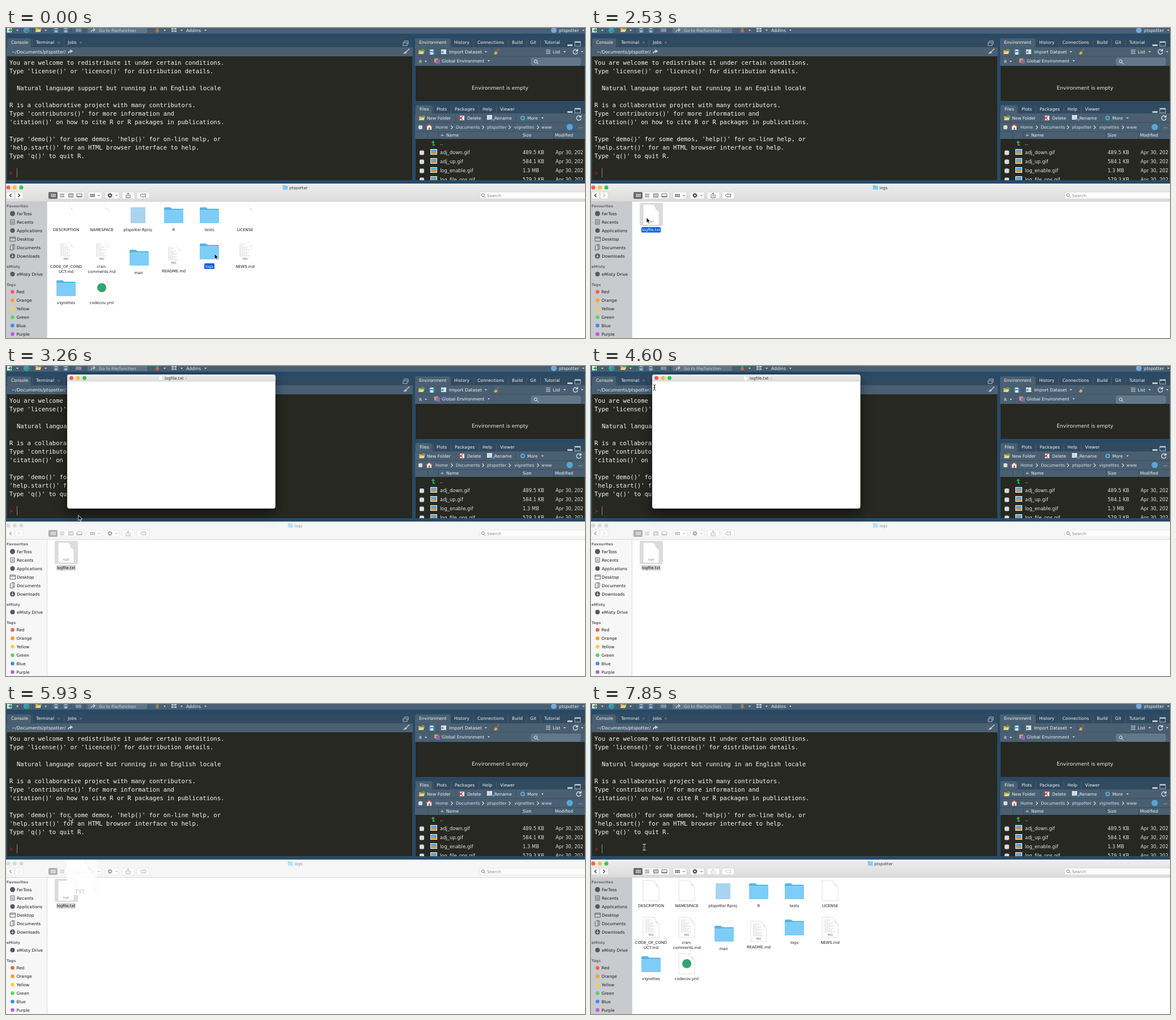
Write an HTML page that moves like this. It is 1022 px wide and 548 px high and loops after 7990 ms.

```html
<!DOCTYPE html>
<html lang="en">
<head>
<meta charset="utf-8">
<title>Log file demo</title>
<style>
html, body { margin: 0; width: 100%; height: 100%; overflow: hidden; background: #264a69; }
svg { display: block; width: 100vw; height: 100vh; font-family: "DejaVu Sans", Verdana, sans-serif; }
.mono { font-family: "DejaVu Sans Mono", monospace; }
.finder { font-family: Inter, Roboto, sans-serif; }
.bar { fill: url(#barFill); }
.side { fill: #c9cace; }
.btn { fill: #fcfcfc; stroke: #c9c9c9; stroke-width: .6; }
.glyph { fill: none; stroke: #555; stroke-width: .9; }
.solid { fill: #555; }
.paper { fill: #fff; stroke: #cfcfcf; stroke-width: .6; }
.bare .paper { stroke: none; }
.idle .bar { fill: #f6f6f6; }
.idle .side { fill: #f7f7f7; }
.idle .btn { stroke: #dedede; }
.idle .tools, .idle .heading { opacity: .5; }
.idle .light { fill: #dadada; }
.idle.hover .light { fill: var(--c); }
.light { fill: var(--c); }
.pick { fill: #0a60d8; }
.pickText { fill: #fff; }
.idle .pick { fill: #d3d3d3; }
.idle .pickText { fill: #111; }
</style>
</head>
<body>
<svg id="stage" viewBox="0 0 1022 548" preserveAspectRatio="none"></svg>
<script>
const stage = document.getElementById('stage');
const FRAME = '#264a69', TABS = '#304a60', PANEL = '#4a6072', DARK = '#272822', PALE = '#f2f4f5';

const rect = (x, y, w, h, fill, more = '') =>
  `<rect x="${x}" y="${y}" width="${w}" height="${h}" fill="${fill}" ${more}/>`;
const path = (d, more = '') => `<path d="${d}" ${more}/>`;
const line = (d, color, width = 1) => path(d, `fill="none" stroke="${color}" stroke-width="${width}"`);
const dot = (x, y, r, fill, more = '') => `<circle cx="${x}" cy="${y}" r="${r}" fill="${fill}" ${more}/>`;
// y is the middle of the line of text
const text = (x, y, s, size = 7.6, fill = PALE, more = '') =>
  `<text x="${x}" y="${(y + size * .36).toFixed(2)}" font-size="${size}" fill="${fill}" ${more}>${s}</text>`;
const mid = 'text-anchor="middle"';
const group = (s, more = '') => `<g ${more}>${s}</g>`;
const caret = (x, y, fill = '#dde') => path(`M${x - 2} ${y - 1}h4l-2 2.4z`, `fill="${fill}"`);
const chevron = (x, y, color) => line(`M${x - 1.5} ${y - 3}l3 3l-3 3`, color, 1.1);

function openFolder(x, y) {
  return path(`M${x - 5} ${y + 4}v-7h4l1 1.5h4v5.5z`, 'fill="#c9a45a"') +
    path(`M${x - 5} ${y + 4}l2.5-4.5h8l-2.5 4.5z`, 'fill="#f0d38a"') +
    path(`M${x} ${y - 3}q3-4 5 0l1-1v3h-3z`, 'fill="#4cae50"');
}
function floppy(x, y) {
  return rect(x - 4, y - 4, 9, 9, '#4a90c8') + rect(x - 2, y - 4, 5, 3, '#dcebf5') + rect(x - 2, y + 1, 5, 4, '#e9f2f8');
}
function sheet(x, y) {
  return rect(x - 4, y - 4, 9, 8, '#eef2f5') + line(`M${x - 4} ${y - 1}h9M${x - 4} ${y + 1.5}h9M${x} ${y - 4}v8`, '#8aa', .6);
}
function paneButtons(y) {
  return rect(991, y + 1, 9, 3, '#c3ccd3') + rect(1004, y - 4, 10, 8, 'none', 'stroke="#aeb9c2"') + rect(1004, y - 4, 10, 2, '#c3ccd3');
}
const refresh = (x, y) => line(`M${x + 3.5} ${y - 2}a4 4 0 1 0 .5 3M${x + 4} ${y - 5}v3.5h-3.5`, '#dfe5e9', 1.3);

function topBar() {
  return rect(0, 0, 1022, 10, PANEL) +
    rect(2, 0, 8, 8, '#eef2f5') + line('M4 4h7M7.5 .5v7', '#27a05a', 2.2) + caret(20, 4) +
    dot(36, 4, 5, '#3f9cc4') + line('M34 6h8M38 2v7', '#27a05a', 1.8) + openFolder(57, 3) + caret(70, 4) +
    group(floppy(88, 3) + floppy(105, 3), 'opacity=".55"') + rect(123, 1, 10, 6, '#7d92a2') +
    line('M25.5 0v9M47 0v9M78 0v9M115 0v9M139 0v9', '#3b5062') +
    rect(144, -4, 105, 13, '#617687', 'rx="2"') + line('M150 7q1-4 6-4M154 .5l3 2.5l-3 3', '#cfd8de', 1.2) +
    text(164, 4, 'Go to file/function', 7.3, '#cfd7dd') +
    dot(267, 5, 3, '#c46b50') + dot(267, 1, 2, '#4aa06a') + caret(280, 4) +
    rect(292, 0, 4, 3, '#aebac4') + rect(297, 0, 4, 3, '#aebac4') + rect(292, 4, 4, 3, '#aebac4') + rect(297, 4, 4, 3, '#aebac4') +
    caret(310, 4) + text(318, 4, 'Addins', 7.7) + caret(352, 4) +
    dot(967, 4, 5, '#75aadb') + text(976, 4, 'ptspotter', 7.7) + caret(1019, 4);
}

function tabs(y, list, firstEnd) {
  const [start] = list[0];
  const tops = list.map(([x], i) => i
    ? line(`M${x - 6.5} ${y + 8}v-14`, '#52697c', .7) : '').join('');
  return rect(start - 7, y - 7, firstEnd - start + 7, 16, PANEL, 'rx="2"') + tops +
    list.map(([x, s]) => text(x, y, s, 7.6)).join('');
}

function consolePane() {
  const lines = [
    [61, 'You are welcome to redistribute it under certain conditions.'],
    [76, "Type 'license()' or 'licence()' for distribution details."],
    [106, 'Natural language support but running in an English locale', 19],
    [136, 'R is a collaborative project with many contributors.'],
    [151, "Type 'contributors()' for more information and"],
    [166, "'citation()' on how to cite R or R packages in publications."],
    [196, "Type 'demo()' for some demos, 'help()' for on-line help, or"],
    [211, "'help.start()' for an HTML browser interface to help."],
    [226, "Type 'q()' to quit R."]];
  return rect(1, 17, 717, 253, TABS, 'rx="3"') +
    tabs(25.5, [[9, 'Console'], [53, 'Terminal'], [109, 'Jobs']], 44) +
    text(90, 25.5, '×', 7, '#8395a3') + text(129, 25.5, '×', 7, '#8395a3') +
    rect(701, 26, 7, 5, 'none', 'stroke="#b7c2ca"') + line('M703 25v-2h7v6', '#b7c2ca') +
    rect(1, 34, 717, 16, PANEL) + text(10, 42, '~/Documents/ptspotter/', 7.85) +
    line('M110 45q0-4 5-4M113 38.5l4 2.5l-4 2.5', '#dfe6ea', 1.4) +
    line('M712 36.5l-6 6', '#c5ccd1', 1.4) + path('M701 46l4-5l3 3z', 'fill="#c5ccd1"') +
    rect(2, 50, 715, 219, DARK) +
    group(lines.map(([y, s, x = 6]) => text(x, y, s, 10.5, '#fafaf5')).join('') +
      text(6, 256, '&gt;', 10.5, '#c81f48'), 'class="mono"') +
    line('M19.5 248v16', '#8a8a84', 1);
}

function environmentPane() {
  return rect(722, 17, 300, 114, TABS, 'rx="3"') +
    tabs(25.5, [[729, 'Environment'], [791, 'History'], [832, 'Connections'], [893, 'Build'], [925, 'Git'], [950, 'Tutorial']], 784) +
    paneButtons(28) + rect(722, 34, 300, 33, PANEL) + line('M722 50h300', '#3a4f61', .7) +
    openFolder(733, 42) + floppy(751, 42) + sheet(772, 42) + path('M769 40l4 2.5l-4 2.5z', 'fill="#4a90c8"') +
    text(782, 42, 'Import Dataset', 7.7) + caret(847, 42) +
    line('M870 37l-4 5', '#b06c3a', 1.5) + path('M861 46l3-5l4 3l-3 3z', 'fill="#e0b04a"') +
    line('M953 39h8M953 42h8M953 45h8', '#dfe5e9') + text(965, 42, 'List') + caret(986, 42) + refresh(1005, 42) + caret(1017, 42) +
    line('M744 35v14M763 35v14M858 35v14M995 35v14M748 51v15', '#3c5163', .7) +
    text(729, 59, 'R', 7.3) + caret(741, 59) +
    rect(756, 54, 7, 7, '#d8a24e') + rect(759, 56, 7, 7, '#8d66b8') + text(769, 58, 'Global Environment', 7.6) + caret(852, 58) +
    rect(927, 53, 87, 13, '#62788a', 'rx="3" stroke="#7b8f9e" stroke-width=".6"') +
    dot(935, 59, 2.6, 'none', 'stroke="#e2e8ec"') + line('M937 61l3 3', '#e2e8ec') +
    rect(723, 67, 298, 62, DARK) + text(872, 105.5, 'Environment is empty', 9.05, '#eeeeea', mid);
}

function filesPane() {
  const files = [['adj_down.gif', '489.5 KB'], ['adj_up.gif', '584.1 KB'], ['log_enable.gif', '1.3 MB'], ['log_file_ops.gif', '579.3 KB']];
  const box = y => rect(730, y - 3.5, 8, 8, '#d9dbdc', 'rx="2"');
  const rows = files.map(([name, size], i) => {
    const y = 220 + 16 * i;
    return box(y) + rect(749, y - 6, 12, 10, '#f1f1f1') + rect(750, y - 5, 10, 5, '#59a5dc') +
      path(`M750 ${y + 3}v-3l4-2l3 2l3-1v4z`, 'fill="#c39a45"') +
      text(766, y, name, 8.4, '#e4e4df') + text(912, y, size, 8.4, '#e4e4df') + text(970, y, 'Apr 30, 2020', 8.4, '#e4e4df');
  }).join('');
  const crumbs = [[758, 'Home', 787], [794, 'Documents', 842], [849, 'ptspotter', 889], [897, 'vignettes', 939], [945, 'www']];
  return rect(722, 135, 300, 135, TABS, 'rx="3"') +
    tabs(143.5, [[730, 'Files'], [760, 'Plots'], [792, 'Packages'], [841, 'Help'], [872, 'Viewer']], 752) +
    paneButtons(146) + rect(722, 151, 300, 45, PANEL) + line('M722 167h300M722 183h300', '#34495b', .8) +
    openFolder(734, 159) + text(743, 159, 'New Folder', 7.5) +
    rect(801, 155, 8, 8, '#eef2f5') + line('M800 156l6 6M806 156l-6 6', '#d83434', 1.7) + text(814, 159, 'Delete', 7.5) +
    sheet(853, 158) + path('M855 161h5v-2l3 3l-3 3v-2h-5z', 'fill="#4a90c8"') + text(862, 159, 'Rename', 7.5) +
    dot(912, 159, 3, 'none', 'stroke="#58a9d8" stroke-width="2"') + text(920, 159, 'More', 7.5) + caret(947, 159) + refresh(1011, 159) +
    line('M794 152v14M845 152v14M900 152v14', '#3c5163', .7) +
    rect(728, 172, 7, 7, '#d9dbdc', 'rx="2"') +
    path('M741 175l6-5l6 5h-2v5h-8v-5z', 'fill="#f4f4f0"') + line('M741 175.5l6-5l6 5', '#d84a3c', 1.4) + rect(746, 176, 2.5, 4, '#a86c3c') +
    crumbs.map(([x, s, c]) => text(x, 175.5, s, 7.5, '#d5e2ec') + (c ? chevron(c, 175.5, '#d5e2ec') : '')).join('') +
    dot(995, 175, 5.5, '#55a7d8') + text(1010, 174, '...', 8) +
    line('M744.5 183v13M763.5 183v13M909.5 183v13M966.5 183v13', '#34495b', .8) +
    path('M767 191h6l-3-4z', 'fill="#9eacb6"') + text(777, 189.5, 'Name', 7.5) + text(912, 189.5, 'Size', 7.5) + text(969, 189.5, 'Modified', 7.5) +
    rect(723, 196, 298, 73, DARK) +
    group(line('M757 207h-3v-5', '#2cab5c', 2) + path('M750.5 203l3.5-4l3.5 4z', 'fill="#2cab5c"') +
      text(766, 204, '..', 8.4) + rows, 'clip-path="url(#filesClip)"');
}

const ink = '#1c1c1c';
function folder(x, y, scale = 1) {
  return group(path('M-17-12q0-2 2-2h9l3 2.5h18q2 0 2 2v4h-34z', 'fill="#57b5e6"') +
    rect(-17, -9, 34, 23, '#7dcdf8', 'rx="1.5"') + line('M-17-8.5h34', '#9edcfb', .8),
    `transform="translate(${x} ${y}) scale(${scale})"`);
}
const PAGE = 'M-14-18H4Q8-15 9-9Q13-8 14-4V18H-14Z';
const FOLD = 'M4-18Q9-16 9-9Q14-9 14-4Q11-11 4-18Z';
function page(x, y, kind = '') {
  let body = path(PAGE, 'class="paper"') + path(FOLD, 'fill="#d4d4d4"');
  if (kind === 'MD') {
    const rows = [...Array(9)].map((_, i) => `M-10 ${-13 + i * 2.6}h${[11, 6, 15, 12, 17, 9, 16, 13, 18][i]}`).join('');
    body += path(rows, 'stroke="#a9a9a9" stroke-width=".6" stroke-dasharray="3 .7"');
  }
  if (kind) body += text(0, 12.5, kind, 5.6, '#777', mid);
  return group(body, `transform="translate(${x} ${y})"`);
}
const label = (x, y, s, fill = ink, more = '') => text(x, y, s, 6.8, fill, mid + more);

function rootView() {
  return group(page(106, 330) + page(169, 330) + page(422, 330) +
    page(106, 395, 'MD') + page(169, 395, 'MD') + page(296, 402, 'MD') + page(422, 395, 'MD') + page(169, 459) +
    rect(220, 317, 26, 28, '#a9d3ef') + dot(169, 459, 8, '#2fa66f') +
    folder(296, 331) + folder(359, 331) + folder(235, 406) + folder(359, 395) + folder(106, 460) +
    [[106, 357, 'DESCRIPTION'], [169, 357, 'NAMESPACE'], [232.5, 357, 'ptspotter.Rproj'], [296, 357, 'R'], [359, 357, 'tests'], [422, 357, 'LICENSE'],
     [106, 421.5, 'CODE_OF_COND'], [106, 430.5, 'UCT.md'], [169, 421.5, 'cran-'], [169, 430.5, 'comments.md'], [234, 432.5, 'man'],
     [296, 429.5, 'README.md'], [422, 421.5, 'NEWS.md'], [106, 486, 'vignettes'], [169, 486, 'codecov.yml']]
      .map(a => label(...a)).join('') +
    rect(350, 416, 18, 10, '#0a60d8', 'id="logsPick" rx="1.5"') + label(359, 421.5, 'logs', ink, ' id="logsLabel"'), 'id="root"');
}
function logsView() {
  return group(group(rect(86, 309, 41, 41, '#dcdcdc', 'rx="2"') + '<rect class="pick" x="89" y="352" width="34" height="9.5" rx="1.5"/>', 'id="filePick"') +
    page(106, 330, 'TXT') + label(106, 357, 'logfile.txt', ink, ' id="fileLabel"'), 'id="logs"');
}

function sidebar() {
  const heads = [[315, 'Favourites'], [422, 'eMisty'], [454, 'Tags']];
  const items = [[328, 'FarToss'], [343, 'Recents'], [358, 'Applications'], [373, 'Desktop'], [388, 'Documents'], [403, 'Downloads'], [435, 'eMisty Drive']];
  const tags = [['Red', '#fc5b57'], ['Orange', '#fd9f2b'], ['Yellow', '#fcd03a'], ['Green', '#5fd364'], ['Blue', '#3d8bfd'], ['Purple', '#b55fe0']];
  return '<rect class="side" x="0" y="307" width="72" height="241"/>' + line('M72.5 307v241', '#d2d2d2', .8) +
    heads.map(([y, s]) => text(1, y, s, 6.4, '#68686c', 'font-weight="600"')).join('') +
    items.map(([y, s]) => text(19, y, s, 7.4, ink)).join('') +
    tags.map(([s, c], i) => dot(11.5, 466.5 + i * 14.9, 3.3, c) + text(18.5, 466.8 + i * 14.9, s, 7.4, ink)).join('') +
    dot(11.5, 328, 4.5, '#58585c') + dot(11.5, 358, 4, '#58585c') + dot(11.5, 435, 4, '#58585c') +
    path('M8 339h7v8h-7zM9.5 342h4M9.5 344.5h4M7 369.5h9.5v7.500h-9.500zM7 371.500h9.500M7.500 385v7.500h5v-9h-3zM11 383h4v8h-2', 'class="glyph"') +
    dot(11.5, 403, 4.6, '#58585c') + line('M11.500 400v5M9.500 403.200l2 2l2-2', '#eee', 1);
}

const lights = (x, y, gap, r) => ['#fc5b57', '#fdbc40', '#34c648'].map((c, i) =>
  dot(x + gap * i, y, r, c)).join('');
const button = (x, w, more = '') => `<rect class="btn" x="${x}" y="290" width="${w}" height="12" rx="2" ${more}/>`;

function finder() {
  const grid = [0, 1, 2].map(c => [0, 1].map(r => rect(79.5 + c * 3, 293.500 + r * 3, 2, 2, '#fff')).join('')).join('');
  const stageLights = ['#fc5b57', '#fdbc40', '#34c648'].map((c, i) =>
    `<circle class="light" style="--c:${c}" cx="${4 + i * 11.5}" cy="282" r="3.5"/>`).join('');
  return rect(0, 275, 1022, 273, '#fff') + '<rect class="bar" x="0" y="275" width="1022" height="32"/>' +
    line('M0 306.500h1022', '#cfcfcf', .8) + stageLights +
    group(folder(493, 282, .26) + text(500, 282, 'ptspotter', 7.1, '#333'), 'id="rootTitle" class="heading"') +
    group(folder(502, 282, .26) + text(509, 282, 'logs', 7.1, '#333'), 'id="logsTitle" class="heading"') +
    button(1, 14) + button(16, 14) + button(75, 63) + button(145, 24) + button(175, 25) + button(205, 22) + button(231, 22) + button(836, 194) +
    group(line('M9.500 293l-3 3l3 3', '#333', 1.2) +
      group(line('M21.500 293l3 3l-3 3', '#333', 1.2), 'id="forward"') +
      rect(75, 290, 16, 12, '#6a6a6a', 'rx="2"') + grid +
      path('M95 293.500h8M95 296h8M95 298.500h8M110.500 293h8v6h-8zM113 293v6M116 293v6M125 293h9v6h-9zM125 297.500h9', 'class="glyph"') +
      [0, 1, 2].map(c => [0, 1].map(r => rect(148.500 + c * 3, 293.500 + r * 3, 2.2, 2.2, '#555')).join('')).join('') +
      line('M162 295l2 2l2-2M193 295l2 2l2-2', '#555', .9) +
      dot(183.500, 296, 2.300, 'none', 'stroke="#444" stroke-width="1.700"') + dot(183.500, 296, 3.700, 'none', 'stroke="#444" stroke-width="1.200" stroke-dasharray="1.450"') +
      group(path('M213.500 295h-1.500v5h7v-5h-1.500M215.500 298v-6M213.500 293.500l2-2l2 2M237 296l2.500-2.500h7v5h-7z', 'class="glyph"'), 'id="actions"'), 'class="tools"') +
    dot(842, 295.500, 2.500, 'none', 'stroke="#666" stroke-width=".9"') + line('M844 297.500l2.500 2.500', '#666', .9) +
    text(849, 296, 'Search', 7.3, '#8a8a8a') + sidebar() + rootView() + logsView();
}

function textWindow() {
  return group(rect(108, 15, 367.500, 237, '#fff', 'rx="4"') +
    path('M108 27.500v-8.500q0-4 4-4h359.500q4 0 4 4v8.500z', 'fill="url(#barFill)"') +
    lights(115.500, 21.300, 11.500, 3.500) +
    group(path(PAGE, 'fill="#fff" stroke="#bbb"'), 'transform="translate(273 21.300) scale(.2)"') +
    text(280, 21.500, 'logfile.txt', 7.1, '#333') + line('M316 20.800l1.800 1.800l1.800-1.800', '#888', .8),
    'id="window" style="filter:drop-shadow(0 9px 10px rgba(0,0,0,.5))"');
}
const zoomWindow = () => group('<rect id="zoomBox" fill="#efefef"/>' +
  group(path(PAGE, 'fill="#fff"') + path(FOLD, 'fill="#e9e9e9"') + text(0, 14.500, 'TXT', 5.400, '#bbb', mid), 'id="zoomPage"'), 'id="zoom" opacity=".94"');

stage.innerHTML = `<defs>
  <linearGradient id="barFill" x2="0" y2="1"><stop stop-color="#efeeef"/><stop offset="1" stop-color="#dcdbdc"/></linearGradient>
  <clipPath id="filesClip"><rect x="723" y="196" width="296" height="73"/></clipPath></defs>` +
  rect(0, 0, 1022, 548, FRAME) + topBar() + consolePane() + environmentPane() + filesPane() + finder() + textWindow() + zoomWindow() +
  path('M0 0V9.500L2.200 7.500L3.800 11L5.300 10.400L3.800 7H6.800Z', 'id="arrow" fill="#000" stroke="#fff" stroke-width=".8"') +
  group(line('M-2.500-5q2.500 0 2.500 2v6q0 2 2.500 2M2.500-5q-2.500 0-2.500 2v6q0 2-2.500 2M-1.500 0h3', '#fff', 2) +
    line('M-2.500-5q2.500 0 2.500 2v6q0 2 2.500 2M2.500-5q-2.500 0-2.500 2v6q0 2-2.500 2M-1.500 0h3', '#333', 1), 'id="beam"');

const LOOP = 7990, TICK = 148;
// tick, x, y
const route = [[0, 368, 399], [5, 361, 399], [10, 361, 399], [11, 273, 406], [16, 98, 335], [20, 98, 335], [26, 187, 121],
  [29, 187, 121], [31, 112, 38], [35, 112, 60], [37, 112, 90], [40, 112, 198], [44, 3, 297], [48, 3, 297], [53, 94, 253]];
// tick: x, y, width, height
const zooms = { 19: [94, 285, 56, 54], 20: [101, 178, 182, 124], 21: [106, 65, 310, 200],
  38: [108, 95, 240, 165], 39: [108, 190, 135, 115], 40: [107, 278, 54, 57] };

const el = Object.fromEntries([...stage.querySelectorAll('[id]')].map(n => [n.id, n]));
const show = (node, on) => node.setAttribute('display', on ? 'inline' : 'none');
const set = (node, attrs) => Object.entries(attrs).forEach(([k, v]) => node.setAttribute(k, v));

function pointerAt(tick) {
  const i = Math.max(1, route.findIndex(p => p[0] >= tick));
  const [t0, x0, y0] = route[i - 1], [t1, x1, y1] = route[i];
  const p = (tick - t0) / (t1 - t0);
  return [x0 + (x1 - x0) * p, y0 + (y1 - y0) * p];
}

function draw(tick) {
  const within = (a, b) => tick >= a && tick < b;
  const inLogs = within(8, 48), picked = within(17, 48), idle = within(20, 47);
  stage.classList.toggle('idle', idle);
  stage.classList.toggle('hover', within(45, 47));
  stage.classList.toggle('bare', tick < 8);
  show(el.root, !inLogs); show(el.rootTitle, !inLogs);
  show(el.logs, inLogs); show(el.logsTitle, inLogs);
  show(el.logsPick, tick < 8);
  set(el.logsLabel, { fill: tick < 8 ? '#fff' : ink });
  show(el.filePick, picked);
  el.fileLabel.classList.toggle('pickText', picked);
  set(el.forward, { opacity: inLogs ? .3 : 1 });
  set(el.actions, { opacity: tick < 8 || picked ? 1 : .3 });

  show(el.window, within(22, 38));
  const zoom = zooms[tick];
  show(el.zoom, zoom);
  if (zoom) {
    const [x, y, width, height] = zoom;
    set(el.zoomBox, { x, y, width, height, fill: width > 60 ? '#efefef' : '#fcfcfc' });
    set(el.zoomPage, { transform: `translate(${x + width * .52 - (width < 60 ? 4.5 : 0)} ${y + height / 2 + 1}) scale(${height / 34})` });
    el.zoom.style.filter = width > 100 ? 'drop-shadow(4px 9px 8px rgba(0,0,0,.4))' : 'none';
  }

  const [x, y] = pointerAt(tick), beam = within(24, 39) || tick >= 51;
  show(el.arrow, !beam); show(el.beam, beam);
  set(beam ? el.beam : el.arrow, { transform: `translate(${x.toFixed(1)} ${y.toFixed(1)})` });
}

const start = performance.now();
function loop() {
  draw(Math.floor((performance.now() - start) % LOOP / TICK));
  requestAnimationFrame(loop);
}
loop();
</script>
</body>
</html>
```
